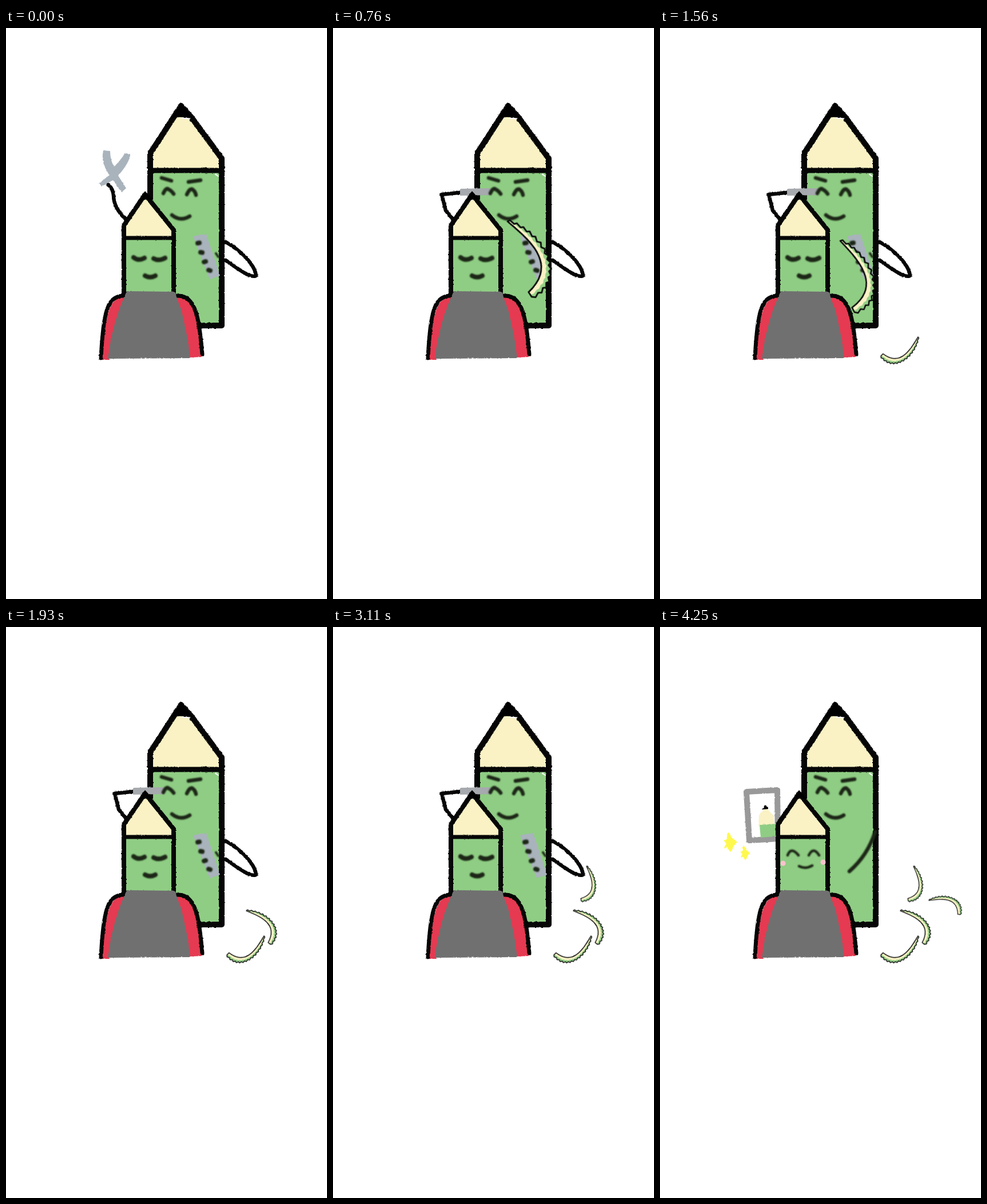
An HTML page that plays this animation: 561x998 px, repeating every 4630 ms.

```html
<!DOCTYPE html>
<html lang="en">
<head>
<meta charset="utf-8">
<title>Pencil barber</title>
<style>
  html, body { margin: 0; width: 100%; height: 100%; overflow: hidden; background: #fff; }
  svg { display: block; width: 100%; height: 100%; }
  path { stroke-linecap: round; stroke-linejoin: round; }
  .rough { filter: url(#rough); }
  .ink { fill: none; stroke: #060606; stroke-width: 8; }
  .arm { stroke-width: 6.5; }
  .face { fill: none; stroke: #1d2716; stroke-width: 6.5; filter: url(#soft); }
  .wood { fill: #faf2c5; }
  .paint { fill: #8fcd84; }
  .steel { fill: #a9b3bc; }
  .blade { fill: none; stroke: #a6a9ad; stroke-width: 12; stroke-linecap: butt; }
  .star { fill: #fff84f; }
  .curl { fill: none; stroke: #0b0b0b; stroke-width: 2.1; }
</style>
</head>
<body>
<svg viewBox="0 0 561 998">
  <defs>
    <filter id="rough" filterUnits="userSpaceOnUse" x="0" y="0" width="561" height="998" color-interpolation-filters="sRGB">
      <feTurbulence type="fractalNoise" baseFrequency=".28" numOctaves="2" seed="4" result="n"/>
      <feDisplacementMap in="SourceGraphic" in2="n" scale="2.6" xChannelSelector="R" yChannelSelector="G"/>
      <feGaussianBlur stdDeviation=".6"/>
    </filter>
    <filter id="soft" filterUnits="userSpaceOnUse" x="0" y="0" width="561" height="998">
      <feGaussianBlur stdDeviation=".9"/>
    </filter>
    <path id="star" d="M-4-18Q1-12 3-7Q8-4 12 0Q7 4 5 8Q3 14 1 17Q-4 14-5 9L-11 11Q-10 6-7 3L-12-3Q-7-4-6-6Q-7-12-4-18Z"/>
  </defs>

  <!-- barber -->
  <g class="rough">
    <path class="wood" d="M253 247V222L298 150H318L376 228V247Z"/>
    <path class="paint" d="M256 250H374V518H256Z"/>
    <path class="ink" style="stroke-width:10" d="M252 300V219L306 136L324 156L377 228V520H338"/>
    <path class="ink" style="stroke-width:9" d="M252 249H377"/>
    <path d="M306 130L287 159Q298 155 308 156L328 159Z"/>
    <path d="M309 157.500L321 158.500M366 256L371 259" stroke="#fff" stroke-width="2"/>
  </g>

  <g data-on="380-3490" class="rough">
    <path class="ink arm" d="M210 335L197 319L190 291L228 287"/>
  </g>
  <path data-on="760-1180 1560-2310 2690-3490" class="blade rough" d="M222 287L277 286"/>
  <path data-on="380-760 1180-1560 2310-2690" class="blade rough" style="stroke-width:9" d="M222 292L276 277M222 281L276 295"/>
  <g data-on="0-380" class="rough">
    <path class="ink arm" d="M210 335C194 320 188 306 188 293Q187 281 179 274"/>
    <path class="steel" d="M170 214L182 215Q182 232 189 242Q199 233 207 220L217 220Q217 234 196 258L210 280L202 287L187 266L167 277L163 271L181 257Q165 236 170 214Z"/>
  </g>

  <path class="face" d="M272 262L289 267M319 269L340 266M275 289Q280 278 284 282Q289 284 293 290M316 291Q322 278 327 283Q331 286 332 292M290 327Q305 339 321 329"/>

  <g data-on="0-3490">
    <g class="rough">
      <path class="steel" d="M327 364L350 360L374 433L356 439Z"/>
      <path class="ink arm" d="M384 374C407 387 435 412 437 433C428 438 407 422 384 406"/>
    </g>
    <path class="face" style="stroke-width:8" d="M335 376L338 375.500M340 392L343 392.500M346 409L349 408M354 423L357 424"/>
    <path class="face" style="stroke-width:4" d="M367 394L371 400"/>
  </g>
  <path data-on="3490-4630" class="face" d="M376 358Q363 399 331 427"/>

  <!-- mirror -->
  <g data-on="3490-4630" class="rough">
    <path d="M151 288L205 285L206 370L156 373Z" fill="#fff" stroke="#999" stroke-width="10"/>
    <path class="wood" d="M172 347L173 329L184 315L199 330L200 347Z"/>
    <path class="paint" d="M174 346L202 344V366L176 368Z"/>
    <path d="M184 311L178 319L190 318Z"/>
  </g>

  <!-- customer -->
  <g class="rough">
    <path class="wood" d="M208 367V345L236 300H252L291 352V367Z"/>
    <path class="paint" d="M208 367H291V464H208Z"/>
    <path class="ink" d="M206 466V345L243 291L293 353V466"/>
    <path class="ink" style="stroke-width:7" d="M206 367H293"/>
    <path d="M243 285L231 303Q244 297 258 302Z"/>
    <path fill="#e53a51" d="M207 469C182 473 174 492 168 580H180L211 469Z"/>
    <path fill="#e53a51" d="M293 469C330 465 338 500 342 575L318 576Z"/>
    <path class="ink" style="stroke-width:7" d="M204 468C177 470 170 496 166 577M299 468C332 466 338 510 343 570"/>
    <path fill="#707070" d="M211 460L296 461Q298 474 305 488Q317 533 322 577L178 578Q184 528 200 486Z"/>
  </g>
  <path data-on="0-3490" class="face" style="stroke-width:8" d="M223 401Q231 408 242 402M258 403Q267 408 278 402M243 433Q252 438 261 433"/>
  <g data-on="3490-4630">
    <path class="face" style="stroke-width:4.500" d="M223 399Q229 383 242 399M260 399Q268 383 278 399M243 418Q254 424 266 417"/>
    <g fill="#f8c3cd"><circle cx="215" cy="413" r="4.500"/><circle cx="285" cy="411" r="4.500"/></g>
  </g>

  <g class="star rough">
    <g data-on="3870-4250">
      <use href="#star" transform="translate(123 376) scale(.7)"/>
      <use href="#star" transform="translate(149 395) scale(.55)"/>
    </g>
    <g data-on="4250-4630">
      <use href="#star" transform="translate(123 376)"/>
      <use href="#star" transform="translate(149 395) scale(.72)"/>
    </g>
  </g>

  <g id="curls"></g>
</svg>
<script>
const LOOP = 4630;
const curls = document.getElementById('curls');

// Shavings: tip x, y, end x, y, visible spans in ms
const shavings = [
  [451, 540, 388, 572, '1180-4630'],
  [420, 496, 461, 553, '1930-4630'],
  [443, 418, 434, 477, '3110-4630'],
  [470, 478, 523, 502, '3490-4630'],
  [305, 338, 346, 466, '760-810'],
  [315, 372, 339, 493, '810-860 1560-1610 2690-2740'],
  [319, 405, 331, 521, '860-910 1610-1660 2740-2790'],
  [321, 437, 322, 550, '910-1020 1660-1770 2790-2950']
];

const bezier = (a, b, c, t) => {
  const s = 1 - t;
  return [0, 1].map(i => 3 * s * s * t * a[i] + 3 * s * t * t * b[i] + t ** 3 * c[i]);
};
const inner = t => bezier([28, -17], [72, -48], [96, 2], t);
const outer = t => bezier([27, -38], [94, -52], [103, 0], t);

function edge(curve, steps, tooth = 0) {
  return Array.from({ length: steps + 1 }, (_, i) => {
    const [x, y] = curve(i / steps);
    const k = i % 2 ? tooth : 0;
    const a = Math.atan2(y + 8, x - 55);
    return [x + k * Math.cos(a), y + k * Math.sin(a)];
  });
}
const toPath = pts => 'M' + pts.map(p => p.map(v => v.toFixed(1)).join(' ')).join('L');

const inside = edge(inner, 20).reverse();
const rim = edge(outer, 30, 3.2);
const middle = edge(t => {
  const a = inner(t), b = outer(t);
  return [0, 1].map(i => a[i] * 0.42 + b[i] * 0.58);
}, 30, 1.5);
const body = toPath([...rim, ...inside]) + 'Z';
const flesh = toPath([...middle, ...inside]) + 'Z';

curls.innerHTML = shavings.map(([x, y, ex, ey, on]) => {
  const a = (ex - x) / 100, b = (ey - y) / 100;
  return `<g data-on="${on}" transform="matrix(${a} ${b} ${-b} ${a} ${x} ${y})">
    <path d="${body}" fill="#95d087"/>
    <path d="${flesh}" fill="#faf2c5"/>
    <path class="curl" d="${body}"/></g>`;
}).join('');

// Turn the visible spans into stepped keyframes
let css = '';
document.querySelectorAll('[data-on]').forEach((el, i) => {
  const at = (ms, o) => ms < LOOP ? `${(ms / LOOP * 100).toFixed(4)}%{opacity:${o}}` : '';
  const spans = el.dataset.on.split(' ').map(s => s.split('-').map(Number));
  const keys = spans.map(([from, to]) => at(from, 1) + at(to, 0)).join('');
  css += `@keyframes k${i}{${spans[0][0] ? at(0, 0) : ''}${keys}}`;
  el.style.animation = `k${i} ${LOOP}ms step-end infinite`;
});
document.head.appendChild(document.createElement('style')).textContent = css;
</script>
</body>
</html>
```
